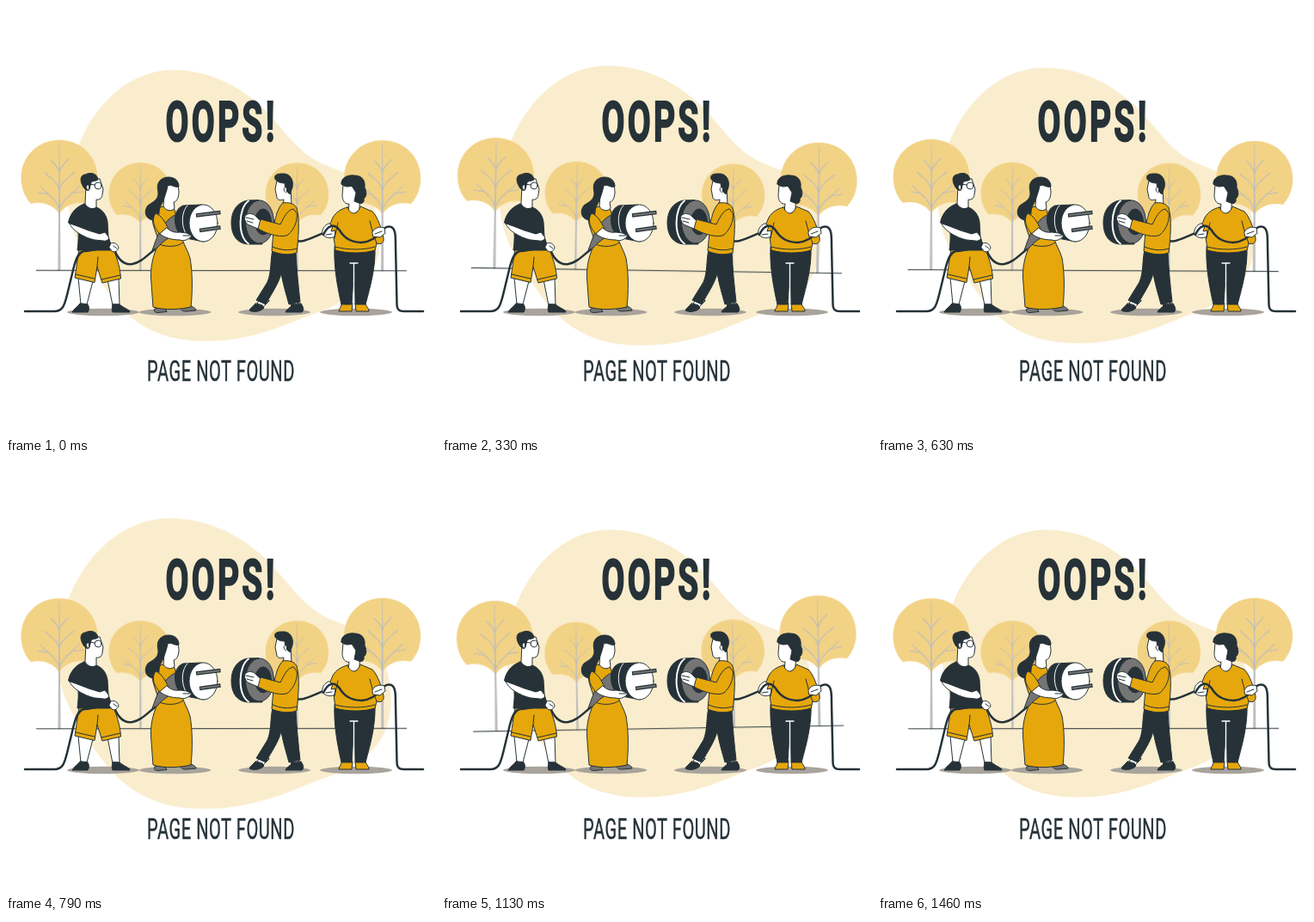
An HTML page for the animation above (1.5 s loop, 500x500 px).

```html
<!DOCTYPE html>
<html lang="en">
<head>
<meta charset="utf-8">
<title>Page not found</title>
<style>
  :root { --ink: #263238; --gold: #e5a70b; --t: 0ms; }
  html, body { margin: 0; width: 100%; height: 100%; overflow: hidden; background: #fff; }
  svg { display: block; width: 100vw; height: 100vh; }

  .blob, .park { animation: 1.5s linear var(--t) infinite paused; }
  .blob { fill: #faedcd; transform-origin: 252.5px 231.5px; animation-name: beat; }
  .park { transform-origin: 250px 232px; animation-name: sway; }
  @keyframes beat {
    0%, 30%, 40%, 60%, 100% { transform: scale(1); }
    10%, 50% { transform: scale(1.1); }
  }
  @keyframes sway {
    0%, 100% { transform: rotate(0deg); }
    25% { transform: rotate(1deg); }
    75% { transform: rotate(-1deg); }
  }

  .people { stroke: var(--ink); stroke-linecap: round; stroke-linejoin: round; }
  .dark { fill: var(--ink); }
  .gold { fill: var(--gold); }
  .skin { fill: #fff; }
  .gray { fill: #757575; }
  .line { fill: none; }
  .pale { fill: none; stroke: #fff; }
  .cable { fill: none; stroke-width: 2.5; }
  .shadow { fill: #a8a39b; }
  text {
    font-family: Roboto, "Liberation Sans", sans-serif;
    fill: var(--ink); stroke: var(--ink); text-anchor: middle;
  }
  .title { font-size: 65px; font-weight: 700; letter-spacing: 5.5px; stroke-width: 2; }
  .note { font-size: 33.5px; font-weight: 400; letter-spacing: .9px; stroke-width: .5; }
</style>
</head>
<body>
<svg viewBox="0 0 500 500">
  <defs>
    <g id="tree">
      <path fill="#f2d285" d="M0-44C25-44 44.500-25 44.500 0C44.500 12 40 23 33 30C21 27 7 31 0 42C-7 31-21 27-33 30C-40 23-44.500 12-44.500 0C-44.500-25-25-44 0-44Z"/>
      <path fill="#bdbdbd" d="M-.3-40H.3L1.600 108H-1.600Z"/>
      <path fill="none" stroke="#bdbdbd" stroke-width="1.100" d="M0 38C-2 25-12 21-22 10M0 38C2 26 13 21 24 9M0 15C-2 4-10 1-17-6M0 15C2 4 10 1 18-7M0-6C-1-13-6-16-10-21M0-6C1-13 6-17 11-22M-12 19L-25 17M13 18L28 16"/>
    </g>
    <ellipse id="shade" class="shadow" rx="42" ry="4.200"/>
  </defs>

  <path class="blob" d="M195 76.500C236 76.500 274 95 303 125C328 152 338 170 364 183C382 191 394 194 404 201C424 216 432 245 432 272C432 318 402 338 368 352C334 363 294 387.500 232 387.500C168 387.500 136 358 110 316C90 285 75 262 75 225C75 150 127 76.500 195 76.500Z"/>

  <g class="park">
    <use href="#tree" transform="translate(156.300 218.500) scale(.825)"/>
    <use href="#tree" transform="translate(338.500 218.500) scale(.825)"/>
    <use href="#tree" transform="translate(62 200)"/>
    <use href="#tree" transform="translate(437.700 200)"/>
    <path d="M35 307.700H466" stroke="#263238"/>
  </g>

  <use href="#shade" x="113" y="356"/>
  <use href="#shade" x="196.500" y="356"/>
  <use href="#shade" x="312" y="356"/>
  <use href="#shade" x="407" y="356"/>

  <g class="people">
    <!-- man with glasses -->
    <g>
      <path class="skin" d="M84 316L87 347H94L101 320ZM118 318L124 348H132L131 316Z"/>
      <path class="dark" d="M86 346C83 350 79 352 77 356H95C97 353 97 350 95 347ZM124 347C123 351 123 354 124 356H144C144 353 138 352 132 347Z"/>
      <path class="gold" d="M85 283H125C130 295 133 307 133.500 317L112 322L106 303L103 321.500L80 316C82 304 83 294 85 283Z"/>
      <path class="line" d="M106 303L107 292M81 312L103 317M111 318L133 313"/>
      <path class="skin" d="M93 208L92 230C95 236 103 238 105 234L105 225C109 226 112 223 112 219L113 213L109 201L97 200Z"/>
      <path class="dark" d="M92 213C87 208 84 197 92 196C98 193 106 194 107 202C104 204 101 203 99 205L97 213C96 215 94 215 92 213Z"/>
      <path class="skin" d="M96 208C93 207 92 213 96 214"/>
      <circle class="skin" cx="107" cy="209" r="3.900"/>
      <path class="line" d="M103 208L96 207"/>
      <path class="dark" d="M91 230C95 236 101 237 105 234C113 237 117 244 118 251L119 268L124 284H83C84 275 85 266 83 259L72.500 252C74 243 80 234 91 230Z"/>
      <path class="cable" d="M22 355H56C66 355 68 348 71 336L79 303C82 292 85 286 91 285C107 284 117 279 125 281C129 292 136 302 147 300C157 298 163 291 173 283"/>
      <path class="skin" d="M74 253C77 261 90 269 103 272L113 273C117 274 121 271 119 268L115 263L109 265L96 261L83 256Z"/>
      <path class="skin" d="M122 276C126 274 130 277 131 281C130 285 126 287 123 285L120 281Z"/>
      <path class="line" d="M125 279L129 282"/>
    </g>

    <!-- woman with plug -->
    <g>
      <path class="gray" d="M173 352C171 355 173 356.500 177 356.500L187 355.500L184 350ZM203 350C203 354 205 355 210 355L221 354C221 351 217 350 214 348Z"/>
      <path class="gold" d="M183 233C176 234 170 239 170 248C171 258 176 266 178 276C172 287 168 300 168.500 316L171 350C184 354 202 353 215 350C217 332 217 310 214 293C211 283 206 277 204 267L196 237Z"/>
      <path class="line" d="M178 277C188 281 200 280 206 275"/>
      <path class="skin" d="M184 220L183 233C186 239 194 239 196 235L195 228C199 228 201 221 201 216L200 206L187 205Z"/>
      <path class="dark" d="M177 216C174 207 179 199 189 199C197 199 201 204 201 210C197 212 193 207 188 209C187 215 185 220 183 226C181 231 178 234 178 240C178 246 173 250 169 248.500C162 247 160 238 165 232C170 228 178 226 177 216Z"/>
      <path class="gray" d="M199 242C188 246 180 257 174 273L170 284L176 281C184 272 192 267 202 265Z"/>
      <path class="dark" d="M227 231L206 232C198 235 195 244 197 254C199 263 203 268 209 270L230 274Z"/>
      <path class="pale" d="M211 232C203 240 203 260 213 270"/>
      <ellipse class="skin" cx="229.500" cy="252.500" rx="16.500" ry="21.500"/>
      <path class="line" stroke-width="4.400" stroke-linecap="butt" d="M221 243.500L249.500 240M225 261L249.500 257.500"/>
      <path class="line" stroke="#757575" stroke-width="2" stroke-linecap="butt" d="M222 243.300L248.500 240.200M226 260.800L248.500 257.700"/>
      <path class="gold" d="M174 241C168 249 173 260 181 267L189 259C185 252 182 244 174 241Z"/>
      <path class="skin" d="M179 265C185 270 194 272 202 272C208 274 213 271 216 267L210 264L202 263C196 264 191 262 187 258Z"/>
      <path class="line" d="M206 267L214 267"/>
    </g>

    <!-- man with socket -->
    <g>
      <path class="cable" d="M307 259C320 267 332 276 346 273C356 270 364 266 373 262"/>
      <path class="skin" d="M295 340L291 349L298 351L306 343ZM330 343L333 351L340 350L339 342Z"/>
      <path class="dark" d="M290 346C287 350 284 351 283 354C288 357 297 355 300 351L298 348ZM332 347C332 351 326 352 325 356H344C347 354 346 350 343 346Z"/>
      <path class="dark" d="M310 283C307 297 309 309 304 321L291 342L302 347C309 334 317 323 320 311C322 323 326 336 329 347L342 344C340 326 338 307 337 286Z"/>
      <path class="skin" d="M315 203L313 213L315 223C316 226 320 226 323 225L322 234L332 232L331 210L326 199Z"/>
      <path class="dark" d="M313 201C311 196 316 195 321 195C330 194 335 202 333 211L330 219L325 214L324 206C320 206 315 205 313 201Z"/>
      <path class="skin" d="M326 211C322 210 322 216 326 217"/>
      <path class="gold" d="M322 229C316 234 312 248 311 262L309 285C318 289 329 290 338 287C340 270 342 248 338 235C335 229 328 228 322 229Z"/>
      <path class="dark" d="M281 226C269 228 262 238 262 252C262 267 269 276 281 277H298L294 226Z"/>
      <path class="pale" stroke-width="2" d="M282 226.500C270 235 269 267 282 276.500"/>
      <ellipse class="gray" cx="295" cy="251" rx="16.500" ry="25"/>
      <ellipse class="dark" cx="299" cy="251" rx="9.500" ry="15"/>
      <path class="skin" d="M299 251L294 248L289 243C285 241 282 241 279 243C276 246 278 251 281 254L288 257L298 261Z"/>
      <path class="line" d="M279 246L288 248M280 250L287 252"/>
      <path class="gold" d="M334 236C327 237 323 246 319 254L296 248L293 259C305 266 322 270 328 266C335 260 340 248 338 241Z"/>
      <path class="line" d="M310 280C319 284 329 285 338 282"/>
    </g>

    <!-- woman holding the cable -->
    <g>
      <path class="gold" d="M390 346C390 351 387 352 387 355H402L403 346ZM406 346L407 355H422C422 351 419 350 418 346Z"/>
      <path class="dark" d="M382 280C381 302 385 325 390 347H402L405 302L406 347H418C424 325 430 303 429 280Z"/>
      <path class="pale" stroke-width="1.300" d="M404.500 299V347M400 299H409"/>
      <path class="skin" d="M392 208L391 220C391 227 395 231 399 230L398 239C401 244 408 242 411 236L412 212Z"/>
      <path class="dark" d="M390 207C389 200 397 196 405 197C414 197 418 203 417 211C420 217 419 222 416 224C417 228 414 231 410 229L405 227L407 217L402 209C397 211 393 210 390 207Z"/>
      <path class="gold" d="M397 234C390 236 384 239 380 246L374 260L381 268L383 284C397 288 416 288 429 284L431 276C436 278 440 275 439 270C437 259 432 245 426 239L412 233C409 243 401 244 397 234Z"/>
      <path class="line" d="M386 252L382 270M423 250L427 265L431 276M383 280C397 284 416 284 429 280"/>
      <path class="skin" d="M375 253C370 255 367 260 368 265C371 270 378 271 382 268L383 261L378 262L380 256Z"/>
      <path class="cable" d="M369 266C374 255 382 252 388 261C394 271 404 275.500 414 275C424 274 432 268 437 262C441 256 445 256 448 257C453 259 453 268 453 278L454.500 346C454.500 353 457 355 463 355H485"/>
      <path class="skin" d="M426 263C428 258 434 256 440 258L441 264L435 269L427 268Z"/>
      <path class="line" d="M372 266L379 265M429 265L437 262"/>
    </g>
  </g>

  <text class="title" transform="translate(250.500 156.500) scale(.6 1)">OOPS!</text>
  <text class="note" transform="translate(250 435.500) scale(.6 1)">PAGE NOT FOUND</text>
</svg>
<script>
  // Step the paused keyframes at 24 frames per second.
  const loop = 1500, step = 1000 / 24;
  const start = performance.now();
  const style = document.documentElement.style;

  function tick() {
    const t = (performance.now() - start) % loop;
    const pose = (Math.floor(t / step) + .5) * step;
    style.setProperty('--t', -pose.toFixed(2) + 'ms');
    requestAnimationFrame(tick);
  }
  tick();
</script>
</body>
</html>
```
